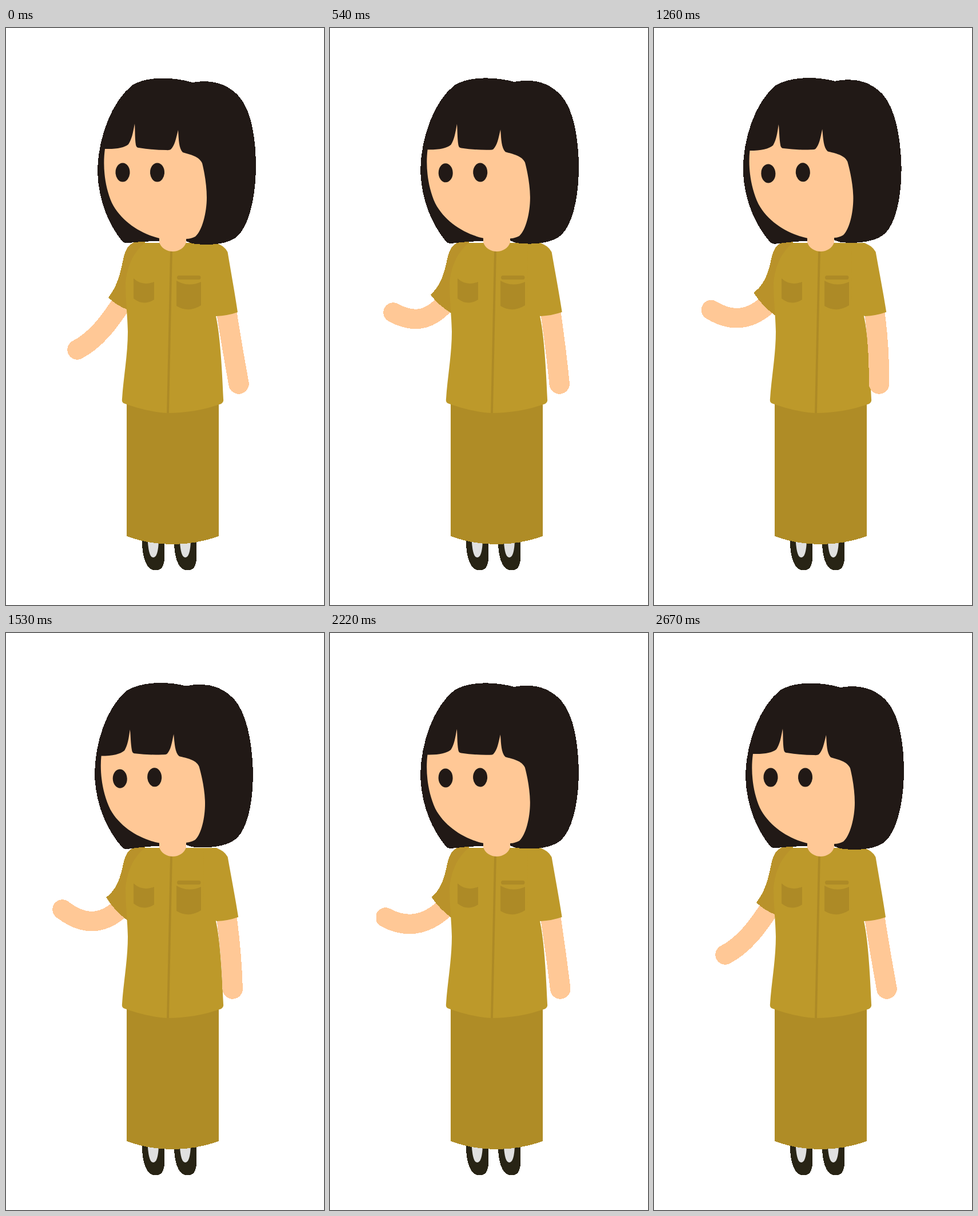
An HTML page for the animation above (2700 ms loop, 556x1007 px).

```html
<!DOCTYPE html>
<html lang="en">
<head>
<meta charset="utf-8">
<title>Waving figure</title>
<style>
html, body { margin: 0; width: 100%; height: 100%; overflow: hidden; background: #fff; }
svg { display: block; width: 100%; height: 100%; }
.crisp { shape-rendering: crispEdges; }
.skin { fill: #ffc896; }
.limb { fill: none; stroke: #ffc896; stroke-linecap: round; }
.hair { fill: #211916; }
.shirt { fill: #bd992a; }
.shade { fill: #b9922a; }
.skirt { fill: #af8c26; }
.dark { fill: #ad8a26; }
.shoe { fill: #282415; }
.sock { fill: #e0e0e0; }
</style>
</head>
<body>
<svg viewBox="0 0 556 1007">
  <defs>
    <clipPath id="edge"><rect x="81" y="0" width="475" height="1007"/></clipPath>
    <g id="foot">
      <path class="shoe crisp" d="M238 890H277V924C277 940 271 946.500 262 946.500C248 946.500 240 932 238 903Z"/>
      <path class="sock" d="M247.500 890H267C267 910 264 924 257.500 924C251 924 248.500 910 247.500 890Z"/>
    </g>
  </defs>

  <use href="#foot"/>
  <use href="#foot" x="56"/>
  <path class="skirt crisp" d="M211 640H372V887Q332 901 291.500 901Q250 901 211 887Z"/>

  <g clip-path="url(#edge)"><path id="wave" class="limb crisp" stroke-width="34.500"/></g>
  <path id="cuff" class="shade crisp"/>

  <path class="shirt" d="M243 375H368C378 379 382 388 382 400L367 503C373 530 377 575 380 648Q381 653 376 656C345 667 312 672 282 672C255 670 230 664 206 655Q202 653 203 647C205 613 213 570 213 530C212 495 209 475 209 445C211 420 221 392 243 375Z"/>
  <path d="M289 388Q287 480 283 672" fill="none" stroke="#ad8a26" stroke-width="3.800"/>
  <path class="dark" d="M223 437Q238 451 259 443V474Q240 486 223 472Z"/>
  <path class="dark" d="M298 441Q319 453 341 443V484Q319 498 298 485Z"/>
  <rect class="dark" x="299" y="432" width="41.500" height="7" rx="3.500"/>

  <path id="rest" class="limb crisp" stroke-width="35.500"/>
  <path id="sleeve" class="shirt" d="M345 376H368Q381 379 387.500 391C394 430 400 462 405 496Q388 502 367 503L345 480Z"/>

  <g id="head">
    <path class="hair crisp" d="M203 372C178 341 160 297 160 245C162 190 185 127 222 99C250 83 296 86 326 95C362 89 388 98 408 120C430 146 437 195 437 245C436 300 424 345 405 363C388 379 350 380 325 376L315 372H268Q242 372 214 375Q207 376 203 372Z"/>
    <path class="skin" d="M173 211C169 240 172 275 185 305C201 337 235 359 268 367L300 371L316 368Q323 368 331 364C343 354 351 322 351 296C351 275 347 252 343 236C338 224 322 221 309 217C302 210 302 195 301 178C297 194 295 205 288 212Q286 213.500 280 213Q256 213 232 209Q228 209 227 204C225 190 226 180 225 167C222 183 220 194 214 203Q203 212 173 211Z"/>
    <g class="hair">
      <ellipse cx="204" cy="252" rx="12.500" ry="16.500"/>
      <ellipse cx="264.500" cy="252" rx="12.500" ry="16.500"/>
    </g>
  </g>
  <path class="skin" d="M268 364H315V374C312 384 302 390 291.500 390C281 390 271 384 268 374Z"/>
</svg>
<script>
const LOOP = 2700, STEP = 30, END = LOOP - STEP;
const restHand = { t: 0, x: 124.5, y: 561.5 };

// Where the waving hand is; the rest of the arm follows from it.
const hand = [
  restHand,
  { t: 540, x: 110.5, y: 496.5 },
  { t: 990, x: 101.5, y: 501.5 },
  { t: 1530, x: 98.5, y: 482.5 },
  { t: 1950, x: 97.5, y: 472.5 },
  { t: 2220, x: 97, y: 496.5 },
  { ...restHand, t: END }
];

const mix = (a, b, k) => a + (b - a) * k;

// Rises evenly from 0 to 1 at the peak, then falls evenly back to 0.
const swing = (t, peak) => t < peak ? t / peak : (END - t) / (END - peak);

function handAt(t) {
  const i = Math.max(1, hand.findIndex(p => p.t >= t));
  const a = hand[i - 1], b = hand[i];
  const k = (t - a.t) / (b.t - a.t);
  return [mix(a.x, b.x, k), mix(a.y, b.y, k)];
}

const el = id => document.getElementById(id);
const wave = el('wave'), cuff = el('cuff'), rest = el('rest'), sleeve = el('sleeve'), head = el('head');

function draw(t) {
  const [x, y] = handAt(t);
  const out = x - 97;
  const lift = Math.sin(Math.PI * t / END);

  // The lower the hand, the flatter the bend of the forearm.
  const sag = 30 - 0.52 * (y - 472);
  wave.setAttribute('d', `M${x} ${y}C${x + 32} ${y + sag} ${166 + out / 2} 515 205 476`);

  const tipX = 179 - 5.5 * swing(t, 1000), tipY = 461 + 0.35 * out, inner = 491 + 10 * lift;
  cuff.setAttribute('d',
    `M243 373C226 369 213 377 208 392C202 410 201 442 ${tipX} ${tipY}` +
    `Q${tipX + 14} ${(tipY + inner) / 2 + 3} 211 ${inner}H225L243 380Z`);

  rest.setAttribute('d', `M384 485Q394 550 ${407 - 13.5 * swing(t, 1250)} 621`);
  sleeve.setAttribute('transform', `rotate(${-0.6 * lift} 375 380)`);
  head.setAttribute('transform', `rotate(${-2.4 * swing(t, 1500)} 258 370)`);
}

const start = performance.now();
function tick(now) {
  const t = Math.max(0, now - start) % LOOP;
  draw(Math.floor(t / STEP) * STEP);
  requestAnimationFrame(tick);
}
draw(0);
requestAnimationFrame(tick);
</script>
</body>
</html>
```
